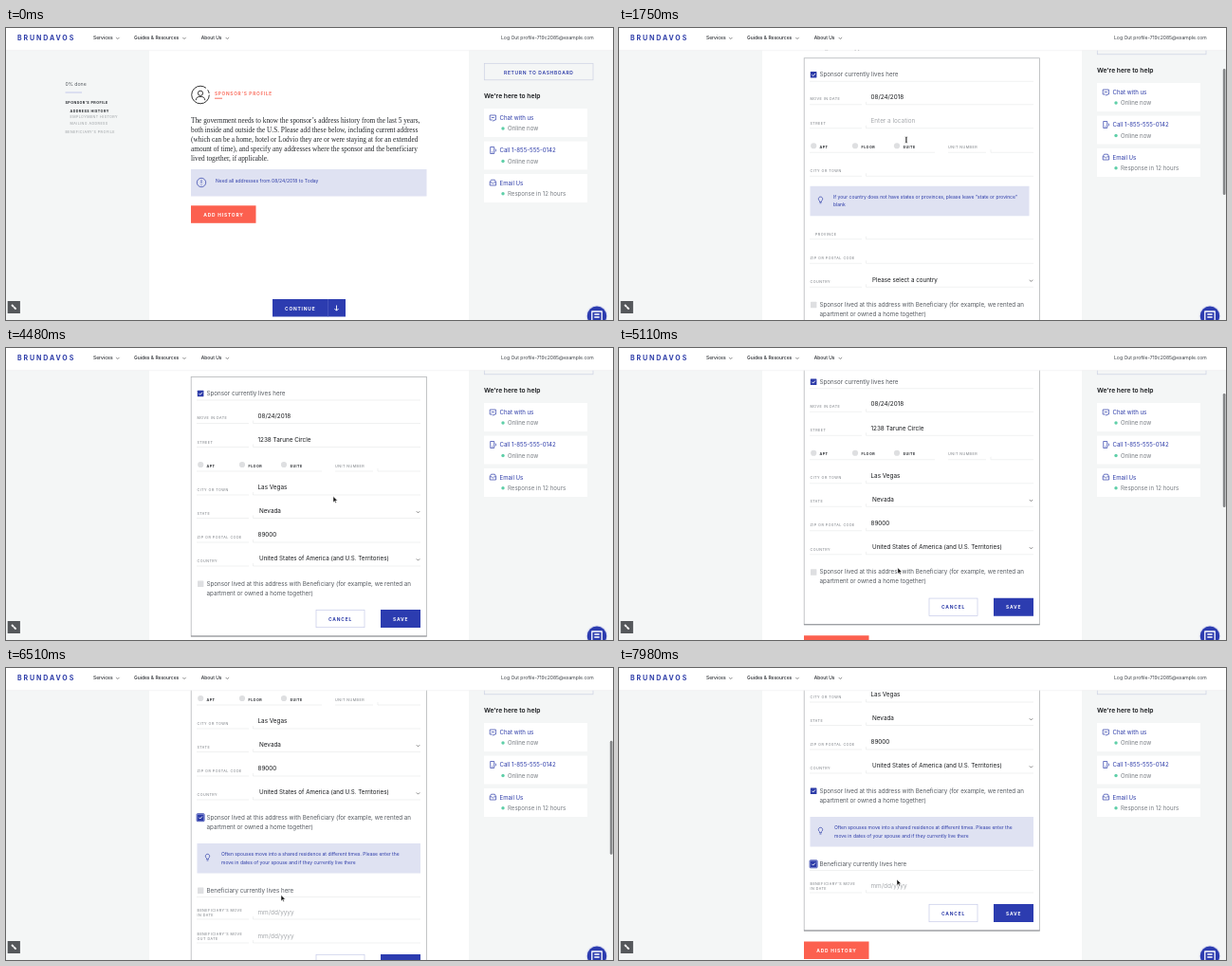
An HTML page for the animation above (8 s loop, 640x308 px).

```html
<!DOCTYPE html>
<html lang="en">
<head>
<meta charset="utf-8">
<title>Address history form</title>
<style>
html, body { margin: 0; width: 100%; height: 100%; overflow: hidden; background: #f4f6f6; }
svg { display: block; width: 640px; height: 308px; font-family: Inter, sans-serif; }
text { dominant-baseline: central; fill: #555a60; font-size: 6.25px; white-space: pre; }
.logo { font-size: 7px; font-weight: 700; letter-spacing: 1.9px; fill: #2c3ba8; }
.nav { font-size: 4.95px; font-weight: 500; fill: #25282d; }
.mail { font-size: 5.05px; fill: #3c4046; }
.body { font: 7.3px "Liberation Serif", serif; fill: #25282c; }
.head { font-size: 6.75px; font-weight: 600; fill: #17191c; }
.link { font-size: 6.1px; fill: #2c3ba8; }
.note { font-size: 5px; fill: #2c3ba8; }
.soft { font-size: 6.1px; fill: #777c82; }
.btn { font-size: 4.9px; font-weight: 700; letter-spacing: .8px; fill: #fff; }
.blue { fill: #2c3ba8; }
.title { font-size: 4.8px; font-weight: 600; letter-spacing: .7px; fill: #f9604f; }
.lab { font-size: 3.7px; letter-spacing: .48px; fill: #777b80; }
.side { font-size: 3.7px; letter-spacing: .43px; fill: #9a9ea2; }
.bold { font-weight: 700; fill: #25282d; }
.val { font-size: 6.35px; fill: #17191c; }
.hint { font-size: 6.4px; fill: #a6a9ad; }
.list text { font: 3.65px "Liberation Sans", sans-serif; fill: #888; }
.list .main { font-size: 4.28px; fill: #222; }
.list .num { font-weight: 700; }
.ink { fill: none; stroke: #2c3ba8; stroke-width: .7; }
.rule { fill: none; stroke: #e6e7e8; stroke-width: .6; }
.chev { fill: none; stroke: #555; stroke-width: .7; }
</style>
</head>
<body>
<svg viewBox="0 0 640 308">
  <defs>
    <path id="chev" class="chev" d="M-1.7 -.8L0 .9 1.7 -.8"/>
    <g id="row"><path class="rule" d="M201 6.5H256M260.5 3.5V6.5H437"/></g>
    <g id="off"><rect x="202" y="-3.2" width="6.4" height="6.4" rx=".5" fill="#dedfe1"/></g>
    <g id="on">
      <rect x="201.8" y="-3.3" width="6.6" height="6.6" rx=".5" fill="#2c3ba8"/>
      <path d="M203.4 0L204.7 1.3 206.9 -1.2" fill="none" stroke="#fff" stroke-width=".9"/>
    </g>
    <rect id="ring" x="201.1" y="-4" width="8" height="8" rx=".8" fill="#b9c0ee" stroke="#2c3ba8" stroke-width=".8"/>
    <path id="bulb" class="ink" d="M-1 2.2V1.2C-3 -.3 -2.3 -3.2 0 -3.2S3 -.3 1 1.2V2.2ZM-.9 3.5H.9"/>
    <g id="pin"><circle cx="264.5" cy="-.6" r="1.5" fill="#b3b3b3"/><path d="M263.2 .2L264.5 2.4 265.8 .2Z" fill="#b3b3b3"/><circle cx="264.5" cy="-.6" r=".55" fill="#fff"/></g>
  </defs>

  <rect width="640" height="308" fill="#f4f6f6"/>
  <rect x="151" width="337" height="308" fill="#fff"/>

  <g id="page">
    <text x="62.5" y="58.5" style="font-size:5.2px">0% done</text>
    <path d="M62.5 68H80" stroke="#c3c8ea"/>
    <text class="side bold" x="62.5" y="78">SPONSOR'S PROFILE</text>
    <text class="side bold" x="67.5" y="87">ADDRESS HISTORY</text>
    <text class="side" x="67.5" y="93.5">EMPLOYMENT HISTORY</text>
    <text class="side" x="67.5" y="100">MAILING ADDRESS</text>
    <text class="side" x="62.5" y="109">BENEFICIARY'S PROFILE</text>

    <g fill="none" stroke="#222" stroke-width=".9">
      <circle cx="205" cy="70.5" r="9.3" stroke-dasharray="50 2.5 4 2"/>
      <circle cx="205" cy="68.8" r="2.6"/>
      <path d="M200.2 76.2C200.4 73 202.5 72.4 205 72.4S209.6 73 209.8 76.2"/>
    </g>
    <text class="title" x="220" y="68.5">SPONSOR'S PROFILE</text>
    <path d="M220 74.2H228" stroke="#f9604f" stroke-width=".9"/>
    <text class="body" x="195" y="97">The government needs to know the sponsor’s address history from the last 5 years,</text>
    <text class="body" x="195" y="107">both inside and outside the U.S. Please add these below, including current address</text>
    <text class="body" x="195" y="117">(which can be a home, hotel or Lodvio they are or were staying at for an extended</text>
    <text class="body" x="195" y="127">amount of time), and specify any addresses where the sponsor and the beneficiary</text>
    <text class="body" x="195" y="137">lived together, if applicable.</text>

    <g id="need">
      <rect x="195" y="149" width="248.5" height="28.5" fill="#dfe2f2"/>
      <circle class="ink" cx="206" cy="163" r="4.7"/>
      <path class="ink" d="M206 160.2V163.9M206 165V165.9"/>
      <text class="note" x="221" y="160.5">Need all addresses from 08/24/2018 to Today</text>
    </g>

    <g id="form">
      <rect id="frame" x="195.2" y="149.5" width="248.3" fill="#fff" stroke="#b4b6b9" stroke-width=".8"/>
      <path id="base" d="M195 0H443.7" stroke="#8d9094" stroke-width="1.1"/>
      <use href="#on" y="167"/>
      <text x="211.5" y="167">Sponsor currently lives here</text>
      <path class="rule" d="M201 174H437"/>

      <use href="#row" y="192"/>
      <text class="lab" x="201.5" y="192.5">MOVE IN DATE</text>
      <text class="val" x="265.5" y="190.5">08/24/2018</text>

      <use href="#row" y="217"/>
      <text class="lab" x="201.5" y="218">STREET</text>
      <text id="street" x="265.5" y="216"></text>
      <path id="caret" stroke="#222" stroke-width=".6" d="M0 212.5V219.5"/>

      <g fill="#dedfe1"><circle cx="205.2" cy="242" r="3.1"/><circle cx="249" cy="242" r="3.1"/><circle cx="293" cy="242" r="3.1"/></g>
      <text class="lab bold" x="211.5" y="243">APT</text>
      <text class="lab bold" x="255.5" y="243">FLOOR</text>
      <text class="lab bold" x="299.5" y="243">SUITE</text>
      <text class="lab" x="347" y="243">UNIT NUMBER</text>
      <path class="rule" d="M201 249H333M347 249H387M392 246V249H437"/>

      <use href="#row" y="267.5"/>
      <text class="lab" x="201.5" y="268.2">CITY OR TOWN</text>

      <g id="abroad">
        <rect x="201.5" y="284.5" width="231" height="31.5" fill="#dfe2f2"/>
        <use href="#bulb" x="212.5" y="299"/>
        <text class="note" x="226" y="296">If your country does not have states or provinces, please leave "state or province"</text>
        <text class="note" x="226" y="304">blank</text>
        <use href="#row" y="334"/>
        <text class="lab" x="207" y="334.8">PROVINCE</text>
      </g>
      <g id="home">
        <text class="val" x="265.5" y="266">Las Vegas</text>
        <use href="#row" y="292"/>
        <text class="lab" x="201.5" y="293">STATE</text>
        <text class="val" x="267" y="291">Nevada</text>
        <use href="#chev" x="434.5" y="292"/>
        <text class="val" x="265.5" y="316.2">89000</text>
      </g>
      <g id="lower">
        <use href="#row" y="317.5"/>
        <text class="lab" x="201.5" y="318.2">ZIP OR POSTAL CODE</text>
        <use href="#row" y="342.5"/>
        <text class="lab" x="201.5" y="343.5">COUNTRY</text>
        <text id="country" class="val" x="267" y="341.3" style="font-size:6.25px"></text>
        <use href="#chev" x="434.5" y="342.2"/>
        <use href="#off" y="367.7"/>
        <text x="211.5" y="367.7">Sponsor lived at this address with Beneficiary (for example, we rented an</text>
        <text x="211.5" y="377.7">apartment or owned a home together)</text>
      </g>
      <g id="shared">
        <use id="ringA" href="#ring" y="367.7"/>
        <use href="#on" y="367.7"/>
        <rect x="201.5" y="395" width="235.5" height="31.5" fill="#dfe2f2"/>
        <use href="#bulb" x="212.5" y="409.5"/>
        <text class="note" x="227" y="406">Often spouses move into a shared residence at different times. Please enter the</text>
        <text class="note" x="227" y="414.5">move in dates of your spouse and if they currently live there</text>
        <use href="#off" y="444.8"/>
        <g id="stays"><use href="#ring" y="444.8"/><use href="#on" y="444.8"/></g>
        <text x="211.5" y="444.8">Beneficiary currently lives here</text>
        <path class="rule" d="M201 451.5H437"/>
        <use href="#row" y="468.5"/>
        <text class="lab" x="201.5" y="465.7">BENEFICIARY'S MOVE</text>
        <text class="lab" x="201.5" y="470.7">IN DATE</text>
        <text class="hint" x="265.5" y="468.3">mm/dd/yyyy</text>
        <g id="leave">
          <use href="#row" y="493.5"/>
          <text class="lab" x="201.5" y="490.8">BENEFICIARY'S MOVE</text>
          <text class="lab" x="201.5" y="495.8">OUT DATE</text>
          <text class="hint" x="265.5" y="493.3">mm/dd/yyyy</text>
        </g>
      </g>
      <g id="acts">
        <rect x="327" y="395.3" width="51" height="18.4" fill="#fff" stroke="#c5cae8" stroke-width=".7"/>
        <text class="btn blue" x="340" y="404.7">CANCEL</text>
        <rect x="395" y="395" width="42" height="19" fill="#2c3cb0"/>
        <text class="btn" x="408" y="404.7">SAVE</text>
      </g>
      <g id="list" class="list">
        <rect x="260.8" y="225.3" width="176.4" height="59" fill="#fff" stroke="#cfcfcf" stroke-width=".6"/>
        <rect id="hover" x="261.1" y="225.6" width="175.8" height="10.3" fill="#f5f5f5"/>
        <g id="items"></g>
        <text x="396.5" y="281" style="font-size:4.6px">powered by</text>
        <circle cx="425" cy="281" r="2.2" fill="#4f86ec"/>
      </g>
    </g>

    <g id="tail">
      <rect x="195" y="187.3" width="68.5" height="18.5" fill="#fc604f"/>
      <text class="btn" x="208.3" y="197">ADD HISTORY</text>
      <rect x="281" y="286" width="77" height="18.5" fill="#2c3cb0"/>
      <path d="M339.5 286V304.5" stroke="#5663c4" stroke-width=".6"/>
      <path d="M348.5 292.5V298M346.4 296L348.5 298.2 350.6 296" fill="none" stroke="#fff" stroke-width=".9"/>
      <text class="btn" x="294" y="295.5">CONTINUE</text>
    </g>
  </g>

  <g id="help">
    <rect x="504.3" y="37.3" width="114.7" height="17.5" fill="none" stroke="#cbd0e2" stroke-width=".7"/>
    <text class="btn blue" x="525" y="46.5" style="font-size:5px;letter-spacing:.65px;font-weight:600">RETURN TO DASHBOARD</text>
    <text class="head" x="504" y="71.5">We're here to help</text>
    <g fill="#fff"><path d="M504 85H613V115H504ZM504 119.5H613V149.5H504ZM504 154H613V184H504Z"/></g>
    <g fill="#5fcfa8"><circle cx="524" cy="106" r="1.7"/><circle cx="524" cy="140.5" r="1.7"/><circle cx="524" cy="174.7" r="1.7"/></g>
    <path class="ink" d="M510.2 92H516.4V97H515L513.8 98.2 512.6 97H510.2ZM511.8 94.5H514.8"/>
    <path class="ink" d="M510.7 125.5H514.7V132.5H510.7ZM512 131H513.4M516 127.5Q517.2 129 516 130.5"/>
    <path class="ink" d="M510.2 162.5L511.5 160.2H515.3L516.6 162.5V166H510.2ZM510.2 162.8H512L513.4 164 514.8 162.8H516.6"/>
    <text class="link" x="520.5" y="94.3">Chat with us</text>
    <text class="soft" x="529" y="105.8">Online now</text>
    <text class="link" x="520.5" y="128.7">Call 1-855-555-0142</text>
    <text class="soft" x="529" y="140.3">Online now</text>
    <text class="link" x="520.5" y="163.2">Email Us</text>
    <text class="soft" x="529" y="174.5">Response in 12 hours</text>
  </g>

  <rect width="640" height="23.5" fill="#fff"/>
  <path d="M0 23.7H640" stroke="#ececee" stroke-width=".5"/>
  <text class="logo" x="12" y="10.3">BRUNDAVOS</text>
  <text class="nav" x="92" y="10.3">Services</text>
  <text class="nav" x="135" y="10.3">Guides &amp; Resources</text>
  <text class="nav" x="205.7" y="10.3">About Us</text>
  <use href="#chev" x="117.8" y="10.7"/><use href="#chev" x="188" y="10.7"/><use href="#chev" x="233.3" y="10.7"/>
  <text class="mail" x="522" y="10.3">Log Out profile-719c2085@example.com</text>

  <rect x="1.7" y="288" width="13.2" height="13" fill="#55585b"/>
  <path d="M6 292L10.6 296.6" stroke="#fff" stroke-width="1.8"/>
  <path d="M5.5 296.8L10.9 291.6" stroke="#55585b" stroke-width=".5"/>
  <circle cx="623" cy="303.7" r="11.3" fill="#dcdff0"/>
  <circle cx="623" cy="303.7" r="10.2" fill="#2c3cb0"/>
  <path d="M617.8 299H628.2V309H617.8ZM620.3 302H625.7M620.3 305H625.7" fill="none" stroke="#fff" stroke-width="1.3" stroke-linejoin="round"/>

  <rect id="thumb" x="636.8" width="2.7" rx="1.3" fill="#858789"/>
  <g id="mouse">
    <path id="arrow" d="M0 0V6.2L1.5 4.9 2.4 7 3.4 6.6 2.5 4.5H4.5Z" fill="#111" stroke="#fff" stroke-width=".5"/>
    <path id="beam" d="M-1.2 -3Q0 -3 0 -2V2Q0 3 -1.2 3M1.2 -3Q0 -3 0 -2V2Q0 3 1.2 3" fill="none" stroke="#222" stroke-width=".7"/>
  </g>
</svg>
<script>
const $ = id => document.getElementById(id);
const LOOP = 8000, STEP = 70;
const OPEN = 350, TYPE = 2170, PICK = 3780, SHARE = 5670, STAY = 6790;

const scrollKeys = [[980, 0], [1800, 119], [4620, 119], [5250, 133], [5880, 133], [6510, 210], [7000, 210], [7770, 238]];
const mouseKeys = [[70, 290, 240], [330, 240, 199], [420, 240, 199], [960, 318.5, 172], [1600, 318.5, 172],
  [1820, 298, 101], [2590, 298, 101], [2870, 295, 110], [3780, 295, 110], [4480, 345, 156.5],
  [5250, 289, 239], [5880, 289, 239], [6510, 290, 239.5], [7000, 290, 239.5], [7770, 293, 223]];

$("items").innerHTML = [
  ["1238", "Tarune Circle", "Las Vegas"],
  ["1239", "West Ollendane Road", "North Las Vegas"],
  ["12340", "Bremola Road", "Henderson"],
  ["1234", "South Lom Ardis Boulevard", "Las Vegas"],
  ["1232", "Lirosa Avenue", "Las Vegas"]
].map(([num, road, city], i) => {
  const y = 230.6 + i * 10.65;
  return `<use href="#pin" y="${y}"/><text x="269.3" y="${y}"><tspan class="main num">${num}</tspan>` +
    `<tspan class="main"> ${road}</tspan><tspan dx="1.6">${city}, NV, USA</tspan></text>`;
}).join("");

// Eased value of column `col` at time t
function track(keys, t, col = 1) {
  const next = keys.findIndex(k => k[0] > t);
  if (next === 0) return keys[0][col];
  if (next < 0) return keys[keys.length - 1][col];
  const a = keys[next - 1], b = keys[next];
  const u = (t - a[0]) / (b[0] - a[0]);
  return a[col] + (b[col] - a[col]) * u * u * (3 - 2 * u);
}

const show = (id, on) => { $(id).style.display = on ? "" : "none"; };
const move = (id, x, y) => $(id).setAttribute("transform", `translate(${x} ${y})`);

function draw(t) {
  const open = t >= OPEN, picked = t >= PICK, shared = t >= SHARE, stays = t >= STAY;
  const scroll = track(scrollKeys, t);
  const typed = "123".slice(0, Math.max(0, Math.floor((t - TYPE) / 140) + 1));
  const grow = !picked ? 42 : !shared ? 0 : stays ? 92 : 117;
  const bottom = 423 + grow;

  move("page", 0, -scroll);
  move("help", 0, -Math.min(scroll, 27));
  show("need", !open);
  show("form", open);
  show("abroad", !picked);
  show("home", picked);
  show("shared", shared);
  show("ringA", !stays);
  show("stays", stays);
  show("leave", !stays);
  move("lower", 0, picked ? 0 : 42);
  move("acts", 0, grow);
  move("base", 0, bottom);
  $("frame").setAttribute("height", bottom - 149.5);
  move("tail", 0, open ? bottom + 11.5 - 187.3 : 0);

  $("street").textContent = picked ? "1238 Tarune Circle" : typed || "Enter a location";
  $("street").setAttribute("class", picked || typed ? "val" : "hint");
  $("country").textContent = picked ? "United States of America (and U.S. Territories)" : "Please select a country";
  show("caret", t >= 1890 && t < 2870);
  move("caret", 265.5 + typed.length * 3.8, 0);
  show("list", t >= 2310 && !picked);
  show("hover", t >= 2800);

  show("thumb", t >= 980 && t < 2170 || t >= 4620 && t < 7840);
  $("thumb").setAttribute("y", scroll * .366);
  $("thumb").setAttribute("height", picked ? 120 : 133);

  const beam = t >= 910 && t < 2590;
  show("mouse", t >= 70 && (t < TYPE || t >= 2590));
  show("beam", beam);
  show("arrow", !beam);
  move("mouse", track(mouseKeys, t), track(mouseKeys, t, 2));
}

function tick() {
  const t = performance.now() % LOOP;
  draw(Math.floor(t / STEP) * STEP);
  requestAnimationFrame(tick);
}
tick();
</script>
</body>
</html>
```
